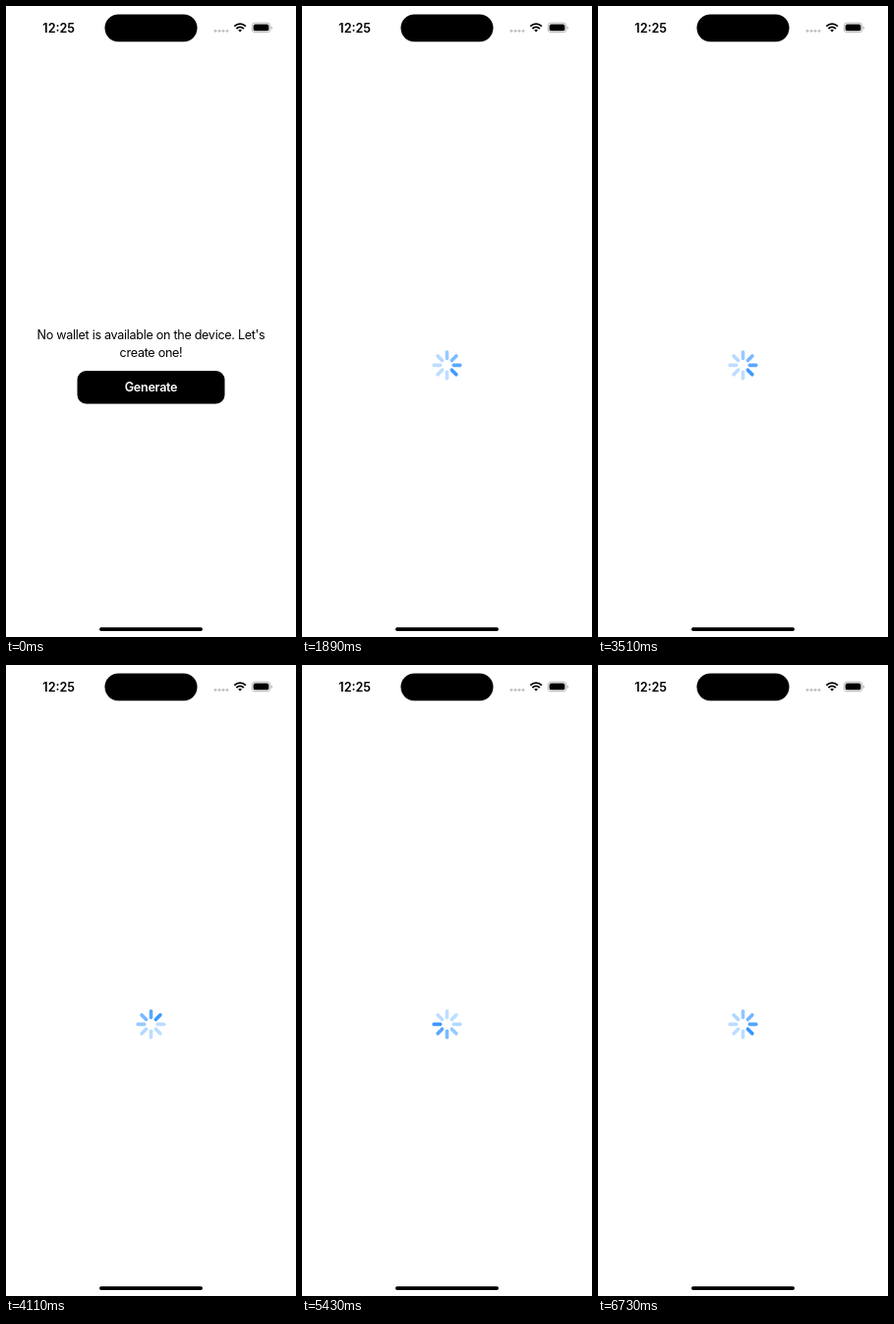
These frames come from a looping animation (295x640 px, 8000 ms). An HTML page:

```html
<!DOCTYPE html>
<html lang="en">
<head>
<meta charset="utf-8">
<title>Wallet</title>
<style>
  html, body { margin: 0; width: 100%; height: 100%; overflow: hidden; background: #fff; }
  svg { display: block; width: 295px; height: 640px; }
  text { font: 12.6px Inter, sans-serif; letter-spacing: -0.3px; text-anchor: middle; }
  .bold { font-weight: 600; }
</style>
</head>
<body>
<svg viewBox="0 0 295 640">
  <rect width="295" height="640" fill="#fff"/>

  <g id="status">
    <text class="bold" x="53.7" y="26.6" style="letter-spacing:0">12:25</text>
    <rect x="100.5" y="8.5" width="94" height="27.7" rx="13.85"/>
    <g fill="#bfbfbf">
      <circle cx="213" cy="25.3" r="1.4"/>
      <circle cx="217" cy="25.3" r="1.4"/>
      <circle cx="221" cy="25.3" r="1.4"/>
      <circle cx="225" cy="25.3" r="1.4"/>
    </g>
    <g fill="none" stroke="#000" stroke-width="1.8">
      <path d="M232.3 20.6a8.2 8.2 0 0 1 11.6 0"/>
      <path d="M234.4 23a5.2 5.2 0 0 1 7.4 0"/>
    </g>
    <path d="M236.2 24.6a2.8 2.8 0 0 1 3.8 0l-1.9 2z"/>
    <rect x="250.2" y="17.1" width="18.6" height="9.6" rx="3.1" fill="none" stroke="#a6a6a6" stroke-width=".8"/>
    <rect x="251.6" y="18.5" width="15.8" height="6.8" rx="1.9"/>
    <path d="M269.7 20.4q1.2.5 1.2 1.5t-1.2 1.5z" fill="#a6a6a6"/>
  </g>

  <g id="prompt">
    <text x="147.5" y="338.2">No wallet is available on the device. Let's</text>
    <text x="147.5" y="356.2">create one!</text>
    <rect x="72.5" y="370" width="150" height="33.5" rx="9"/>
    <text class="bold" x="147.5" y="391.2" fill="#fff">Generate</text>
  </g>

  <g id="spinner" transform="translate(147.5 364.4)" stroke="#007aff" stroke-width="3.6" stroke-linecap="round"></g>

  <rect x="95" y="630.2" width="105" height="3.8" rx="1.9"/>
</svg>
<script>
  const LOOP = 8000;
  const SPIN_START = 1330;
  const STEP = 101.3;        // ms for the highlight to reach the next spoke
  const FIRST_PHASE = 6.2;
  const SPOKES = 8;

  // Runs of evenly spaced redraws: first time, last time, count.
  const runs = [
    [1330, 1330, 1], [1480, 1890, 5], [2040, 2040, 1], [2190, 2190, 1],
    [2340, 3050, 8], [3200, 3610, 5], [3760, 3860, 2], [4010, 4110, 2],
    [4260, 4870, 7], [5020, 5130, 2], [5280, 5280, 1], [5430, 6230, 9],
    [6330, 6730, 5]
  ];
  const redraws = runs.flatMap(([first, last, count]) =>
    Array.from({ length: count }, (_, i) =>
      Math.round((first + (last - first) * i / Math.max(1, count - 1)) / 10) * 10));

  const prompt = document.getElementById('prompt');
  const spinner = document.getElementById('spinner');

  const spokes = Array.from({ length: SPOKES }, (_, i) => {
    const line = document.createElementNS('http://www.w3.org/2000/svg', 'line');
    line.setAttribute('y1', -6.9);
    line.setAttribute('y2', -13.3);
    line.setAttribute('transform', `rotate(${i * 360 / SPOKES})`);
    return spinner.appendChild(line);
  });

  function render(time) {
    const spinning = time >= SPIN_START;
    prompt.style.display = spinning ? 'none' : '';
    spinner.style.display = spinning ? '' : 'none';
    if (!spinning) return;

    const shown = redraws.filter(t => t <= time).pop();
    const phase = FIRST_PHASE + (shown - SPIN_START) / STEP;
    spokes.forEach((spoke, i) => {
      const age = (phase - i + SPOKES) % SPOKES;
      spoke.setAttribute('stroke-opacity', Math.max(0.26, 0.85 - 0.12 * age));
    });
  }

  const start = performance.now();
  function tick() {
    render((performance.now() - start) % LOOP);
    requestAnimationFrame(tick);
  }
  render(0);
  requestAnimationFrame(tick);
</script>
</body>
</html>
```
